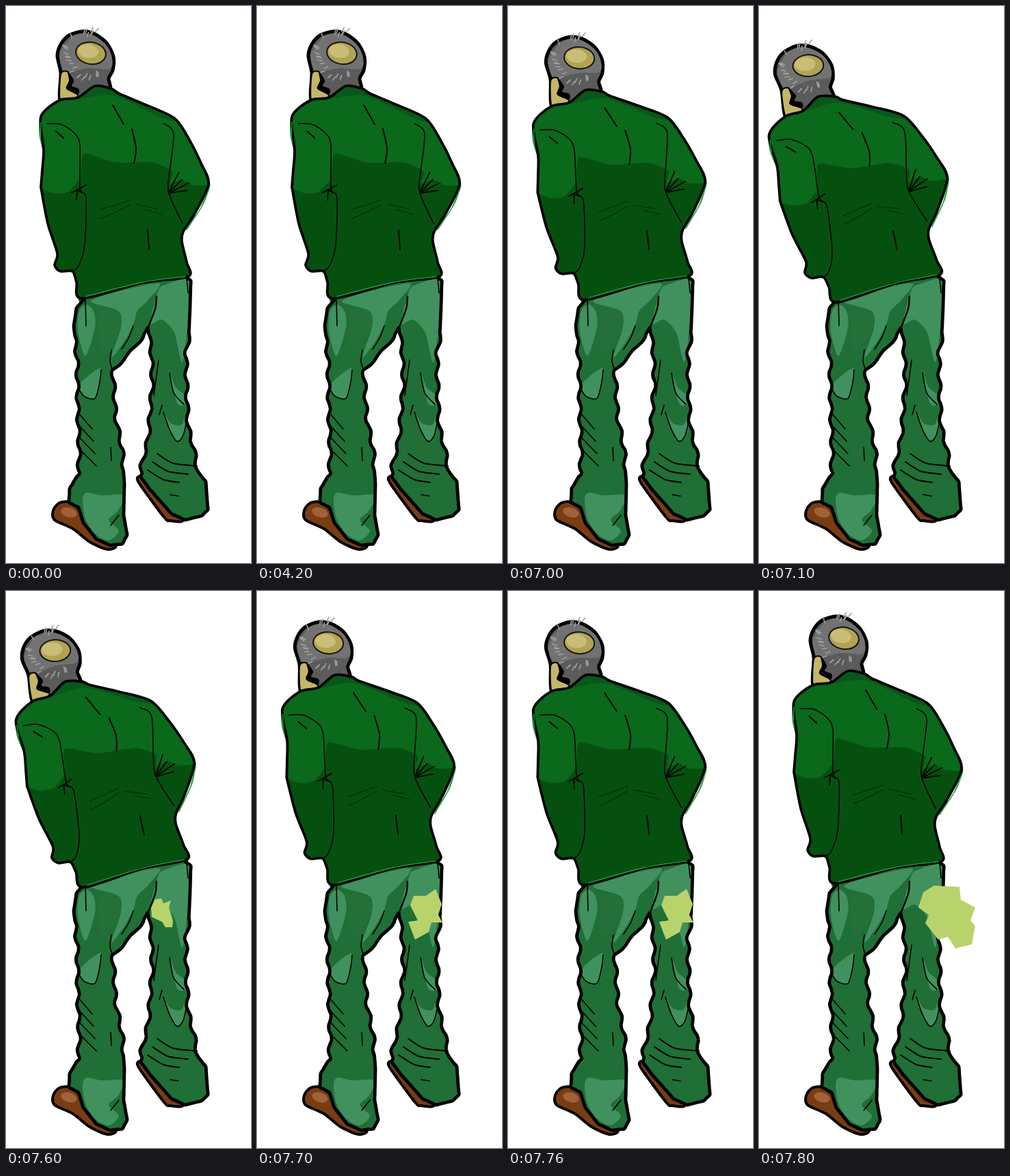
These frames come from a looping animation (358 by 815 pixels, 7900 ms). An HTML page:

```html
<!DOCTYPE html>
<html lang="en">
<head>
<meta charset="utf-8">
<title>Leaning man</title>
<style>
  html, body { margin: 0; width: 100%; height: 100%; overflow: hidden; background: #fff; }
  svg { display: block; width: 100vw; height: 100vh; }
  path { stroke-linecap: round; stroke-linejoin: round; }
</style>
</head>
<body>
<svg id="stage" viewBox="0 0 358 815"></svg>
<script>
const LOOP = 7900, TAU = Math.PI * 2;
const INK = '#000', DARK = '#06500f', GREEN = '#0a691b', RIM = '#1fa544';
const CLOTH = '#206f36', PALE = '#41915f', SHOE = '#7a3c12', SKIN = '#c3b669', GAS = '#b8d36b';
const svg = document.getElementById('stage');
const bendable = [];
let bending = false;

let seed = 11;
const random = () => (seed = seed * 16807 % 2147483647) / 2147483647;
const mix = (a, b, t) => a + (b - a) * t;
const range = n => [...Array(n).keys()];
const fix = v => v.toFixed(1);
const parse = s => s.trim().split(/\s+/).map(p => p.split(',').map(Number));
const polar = (x, y, r, a) => [x + r * Math.cos(a), y + r * Math.sin(a)];

// Catmull-Rom curve through the points; k = 0 gives straight edges.
function trace(pts, closed, k) {
  const n = pts.length;
  const at = i => closed ? pts[(i + n) % n] : pts[Math.max(0, Math.min(n - 1, i))];
  let d = 'M' + pts[0].map(fix);
  for (let i = 0; i < (closed ? n : n - 1); i++) {
    const [a, b, c, e] = [at(i - 1), at(i), at(i + 1), at(i + 2)];
    const p = b.map((v, j) => fix(v + (c[j] - a[j]) * k));
    const q = c.map((v, j) => fix(v - (e[j] - b[j]) * k));
    d += `C${p} ${q} ${c.map(fix)}`;
  }
  return d + (closed ? 'Z' : '');
}

// Rumpled cloth: subdivide an edge and sway it sideways along the leg.
function ripple(pts) {
  const sway = y => y > 482 && y < 685 ? 2.2 * Math.cos((y - 490) / 33 * TAU) : 0;
  return pts.flatMap((p, i) => {
    const q = pts[i + 1] || p;
    const n = Math.ceil(Math.hypot(q[0] - p[0], q[1] - p[1]) / 8) || 1;
    return range(n).map(j => {
      const y = mix(p[1], q[1], j / n);
      return [mix(p[0], q[0], j / n) + sway(y), y];
    });
  });
}

// The torso leans left, more strongly the higher the point.
function lean([x, y], amount) {
  const t = (410 - y) / 340;
  const turn = 0.06 + 0.16 * t - 0.03 * t * t;
  return [x - amount * (44 * t + 8 * t * t), y + amount * (220 - x) * turn];
}

function add(points, { fill = 'none', stroke = 'none', width = 0, k = 0.14 }) {
  const el = document.createElementNS('http://www.w3.org/2000/svg', 'path');
  const pts = typeof points === 'string' ? parse(points) : points;
  const closed = fill !== 'none';
  el.setAttribute('d', trace(pts, closed, k));
  el.setAttribute('fill', fill);
  el.setAttribute('stroke', stroke);
  el.setAttribute('stroke-width', width);
  svg.append(el);
  if (bending) bendable.push({ el, pts, closed, k });
  return el;
}
const area = (points, fill, k) => add(points, { fill, k });
const line = (points, width = 1.6, stroke = INK) => add(points, { stroke, width });
const lines = (list, width, stroke) => list.split('|').forEach(p => line(p, width, stroke));
const oval = (x, y, rx, ry, tilt) => range(10).map(i => {
  const [u, v] = polar(0, 0, 1, i * TAU / 10);
  const c = Math.cos(tilt), s = Math.sin(tilt);
  return [x + u * rx * c - v * ry * s, y + u * rx * s + v * ry * c];
});
const fan = (x, y, n, from, to, near, far) => range(n).forEach(i => {
  const a = mix(from, to, i / (n - 1));
  line([polar(x, y, near, a), polar(x, y, far - i % 2 * 6, a)], 1.7);
});

function drawShoes() {
  const ink = { fill: SHOE, stroke: INK, width: 4 };
  add('94,726 78,727 69,738 71,752 98,765 122,784 148,795 160,789 126,768 108,738', ink);
  area(oval(92, 741, 12, 7, 0.3), '#a0623a');
  add('193,689 195,699 231,748 240,753 258,750 206,698 200,689', ink);
}

function drawTrousers() {
  const left = ripple(parse(`113,430 103,442 99,468 104,520 105,590 107,650 106,684 93,706 92,726
    106,734 113,756 132,780 152,789 170,787 177,774 172,745 173,700 170,650 160,600 158,560 156,533
    180,509 199,485 207,471`));
  const right = ripple(parse(`207,471 212,500 214,550 211,590 208,632 198,672 197,689 210,707 242,743
    262,752 286,746 295,737 292,696 280,681 275,650 266,615 264,560 263,510 267,485 269,440 270,402 262,396`));

  add('113,426 120,442 200,472 210,476 262,402 262,392', { fill: CLOTH, stroke: CLOTH, width: 3, k: 0 });
  [left, right].forEach(leg => area(leg, CLOTH));

  // Lit folds
  area('107,446 118,437 128,447 130,470 116,512 105,476', PALE);
  area('124,432 170,416 224,406 208,430 192,446 186,466 172,492 154,514 168,470 164,446', PALE);
  area('222,418 232,408 268,400 268,440 258,521 246,478 228,459 211,464', PALE);
  area('137,447 164,447 167,470 146,505 135,494', '#256f38');
  area('107,554 139,530 131,573 114,571', PALE);
  area('240,538 248,558 262,570 262,583 250,581', PALE);
  area('230,592 240,610 256,613 262,600 262,622 252,637 242,624', PALE);
  area('112,722 118,712 140,716 172,716 164,738 150,752 165,768 150,782 130,772 116,750', PALE);

  [left, right].forEach(leg => line(leg, 4.8));
  line('220,425 218,443 207,472', 2.4);
  lines(`116,430 117,468|186,468 179,486 169,502|154,503 152,520 156,533|139,532 137,550 130,574 114,571 105,558
    |223,518 216,570|239,537 245,566 260,583|228,584 224,598|230,594 239,620 250,637 259,628 265,602
    |165,745 153,760|240,715 252,717|153,646 154,665|264,398 266,420`, 1.6);
  range(4).forEach(i => line([[108, 598 + 17 * i], [126 + 2 * i, 619 + 18 * i]]));
  range(3).forEach(i => {
    const x = 221 - 7 * i, y = 655 + 12 * i;
    line([[x, y], [x + 23, y + 14], [x + 58 - 6 * i, y + 18]], 2);
  });
}

function drawHead() {
  add('79,138 80,98 75,73 80,56 92,43 112,37 130,41 147,54 157,74 156,94 150,106 152,124 125,136 100,142',
    { fill: '#5b5b5b', stroke: INK, width: 5 });
  area('79,70 97,45 112,41 130,44 148,59 155,76 152,92 120,91 86,96', '#727272');
  range(26).forEach(() => {
    const a = mix(1.1, 5, random()), r = mix(25, 36, random());
    line([polar(121, 70, r, a), polar(121, 70, r + 6, a + 0.08)], 1.6, '#a0a0a0');
  });
  add(oval(124, 69, 22, 16, 0.16), { fill: '#b0a354', stroke: '#17150c', width: 2, k: 1 / 6 });
  area(oval(120, 66, 15, 10, 0.16), '#c9bd77', 1 / 6);
  add('80,100 90,96 94,108 90,120 105,131 92,140 79,138', { fill: SKIN, stroke: INK, width: 2 });
  area('90,95 99,109 96,117 106,121 105,129 88,121 92,109', INK);
}

function drawJacket() {
  const back = `51,265 53,240 55,210 51,162 78,138 105,134 130,117 154,121 165,128 205,145
    247,165 268,196 285,230 296,261`;
  const coat = `${back} 275,305 259,330 257,345 264,375 266,396 200,405 111,428 103,404 97,388 79,388
    71,379 75,362 61,318 51,265`;
  area(coat, DARK, 0.1);
  area(`${back} 272,262 258,254 240,260 243,242 215,229 160,229 114,216 108,252 90,272 70,274`, GREEN, 0.1);
  area('108,135 130,119 154,123 247,167 226,163 158,131', '#07581a');
  lines('50,164 49,188 54,210|298,262 288,290 264,327|257,345 262,372', 1.6, RIM);
  line(coat, 3.8);
  lines('51,170 50,192|297,267 286,293|117,425 200,404 262,396', 1.3, RIM);

  // Seams and creases
  lines(`60,172 80,173 99,185 108,203 108,266 117,281 115,350 106,380 96,389
    |230,172 245,188 237,260 241,282 258,318`, 1.5);
  lines('156,145 172,173|184,180 190,208 187,230|73,183 84,193|207,328 209,356', 1.9);
  lines('138,298 182,284|139,311 160,302 181,291|190,290 222,297|204,298 228,305', 1.1, '#022c07');
  fan(104, 269, 4, -0.5, 2.7, 0, 15);
  fan(237, 274, 4, -1.1, -0.15, 3, 34);
}

drawShoes();
drawTrousers();
bending = true;
drawHead();
drawJacket();
bending = false;

const puffs = [
  '212,464 218,451 227,450 230,457 241,453 238,463 244,482 243,492 233,492 228,484 213,477',
  '229,446 247,446 261,436 270,458 265,474 271,485 255,485 251,499 231,510 221,484 235,482 224,460',
  '233,463 240,441 256,431 293,433 295,452 316,463 309,482 316,490 311,517 287,523 276,506 262,510 243,486 248,474'
].map(p => area(p, GAS, 0));

// [start time, amount of lean, visible puff]
const steps = [[0, 0, -1], [7000, 0.38, -1], [7100, 1, -1], [7600, 1, 0], [7700, 0.38, 1], [7800, 0, 2]];
let shown = null;

function draw(ms) {
  const step = steps.filter(s => s[0] <= ms % LOOP).pop();
  if (step === shown) return;
  shown = step;
  const [, amount, puff] = step;
  for (const { el, pts, closed, k } of bendable)
    el.setAttribute('d', trace(pts.map(p => lean(p, amount)), closed, k));
  puffs.forEach((el, i) => el.setAttribute('visibility', i === puff ? 'visible' : 'hidden'));
}

const begin = performance.now();
function tick() {
  draw(performance.now() - begin);
  requestAnimationFrame(tick);
}
tick();
</script>
</body>
</html>
```
